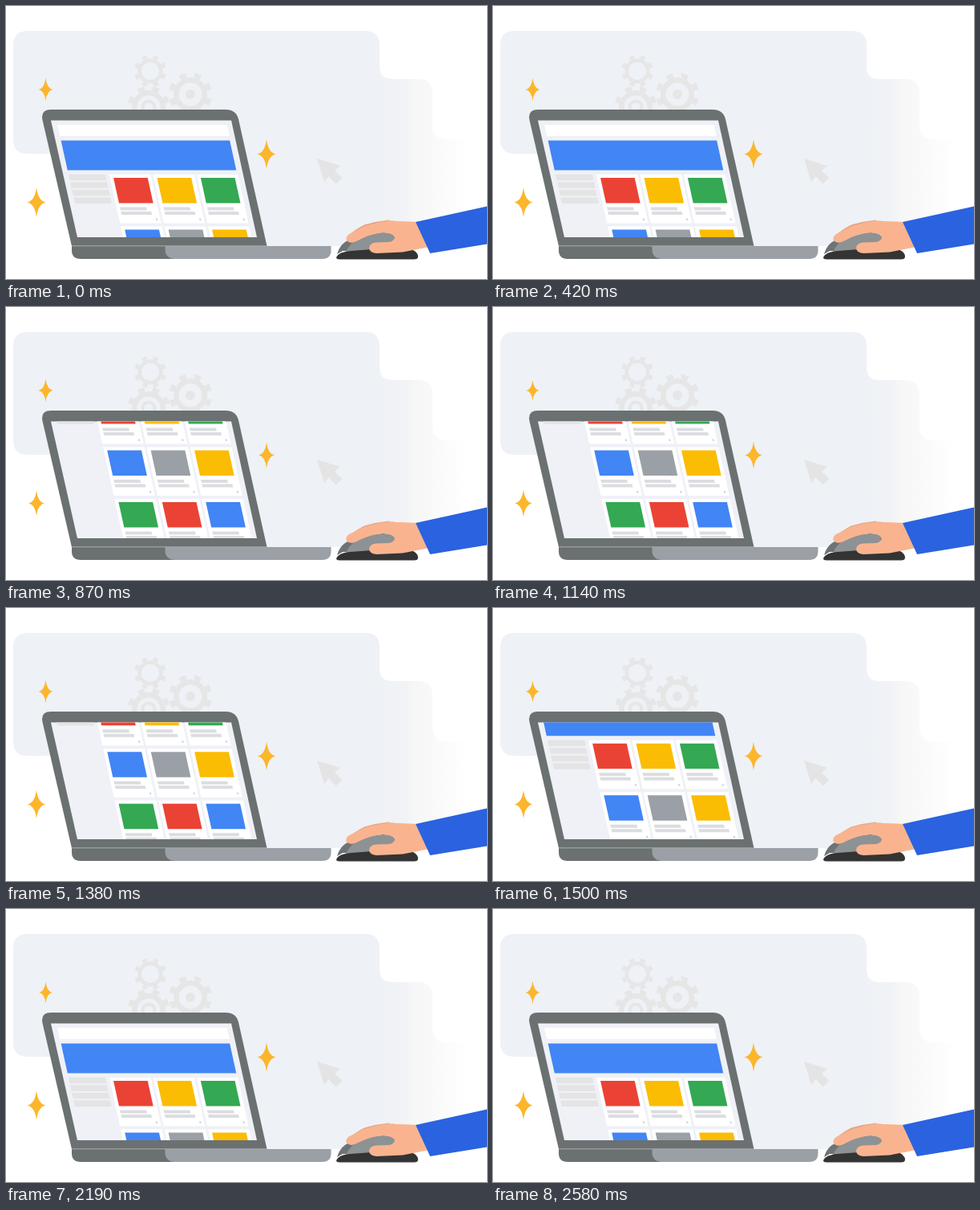
Recreate the animation shown at these times as an HTML page. Size 600x340 px, loop 2700 ms.

```html
<!DOCTYPE html>
<html lang="en">
<head>
<meta charset="utf-8">
<title>Scrolling laptop</title>
<style>
  html, body { margin: 0; width: 100%; height: 100%; overflow: hidden; background: #fff; }
  svg { display: block; width: 600px; height: 340px; }
</style>
</head>
<body>
<svg viewBox="0 0 600 340">
  <defs>
    <linearGradient id="fade" gradientUnits="userSpaceOnUse" x1="460" x2="576" y1="0" y2="0">
      <stop stop-color="#eef1f6"/>
      <stop offset=".34" stop-color="#f1f3f6"/>
      <stop offset=".4" stop-color="#f6f6f7"/>
      <stop offset=".62" stop-color="#f8f9f8"/>
      <stop offset="1" stop-color="#fff"/>
    </linearGradient>
    <clipPath id="screen"><path d="M56 142.500H281L313 288H89Z"/></clipPath>
    <path id="star" d="M0-18.500Q2-2 11.500 0Q2 2 0 18.500Q-2 2-11.500 0Q-2-2 0-18.500Z"/>
  </defs>

  <path fill="url(#fade)" d="M27 31H448Q466 31 466 49V75Q466 91 482 91H514Q532 91 532 109V148Q532 166 550 166H576V260L520 299H90L70 184H27Q9 184 9 166V49Q9 31 27 31Z"/>
  <g id="gears" fill="none" stroke="#e6e6e7"></g>
  <path fill="#e4e4e5" d="M388 190L417 199L410 205L419.500 214L411.500 221.500L402.500 212L397 219Z"/>

  <path fill="#6b7071" d="M56 129H274Q287 129 290 141L325.500 299H82L45.500 142Q43 129 56 129Z"/>
  <path fill="#eff1f7" d="M56 142.500H281L313 288H89Z"/>
  <g clip-path="url(#screen)">
    <g transform="matrix(1 0 .22 1 -31.24 0)"><g id="page"></g></g>
  </g>
  <path fill="#6b7071" d="M82 299H300V315H93Q82 315 82 304Z"/>
  <path fill="#9aa0a6" d="M198.500 299H405.500V304Q405.500 315 394.500 315H210Q198.500 314 198.500 303Z"/>
  <path stroke="#a9adaf" d="M82 298.800H325"/>

  <path fill="#6e7376" d="M413 309Q417 294 433 289L470 282Q484 282 488 292L505 305H420Z"/>
  <path fill="#8d9295" d="M424 306Q430 293 444 287Q466 280 482 284Q488 289 483 295L462 299L480 305Z"/>
  <path fill="#343434" d="M412 313Q415 306 430 305Q470 301 506 303Q514 307 514 312Q514 315.500 509 315.500H416Q412 315.500 412 313Z"/>
  <path fill="#e8a27d" d="M426 288Q429 282 447 272.500Q462 268 478 266.500L484 275L440 289Z"/>
  <path id="finger" fill="#f9b48f" d="M484 267.500L477 267.500Q462 269.500 448 274L428 284Q423 288 425 292Q429 297 437 293Q452 285 464 283Q476 281 484 285L496 276Z"/>
  <path fill="#f9b48f" d="M476 267.500L514 269L528 300L495 306.500L462 308Q453 307 453 301Q454 295 462 294.500L478 294Q485 292 485 288Q483 283 472 282Z"/>
  <path fill="#2a62e0" d="M511 269L600 249.500V296.500L529 308Z"/>

  <g id="stars" fill="#fbb62c"></g>
</svg>
<script>
const LOOP = 2700, STEP = 30, SCROLL = 100;
const $ = id => document.getElementById(id);
const red = '#ea4335', yellow = '#fbbc04', green = '#34a853', blue = '#4285f4', gray = '#9aa0a6';

function add(parent, tag, attrs) {
  const el = document.createElementNS('http://www.w3.org/2000/svg', tag);
  for (const name in attrs) el.setAttribute(name, attrs[name]);
  return parent.appendChild(el);
}

const ring = (cx, cy, r, width, more) =>
  add($('gears'), 'circle', { cx, cy, r, 'stroke-width': width, ...more });

function gear(x, y, hole, body, tip) {
  ring(x, y, (hole + body) / 2, body - hole);
  ring(x, y, (body + tip) / 2, tip - body + 1, {
    pathLength: 80, 'stroke-dasharray': '4.5 5.5', transform: `rotate(12 ${x} ${y})`
  });
}
gear(180, 81, 11, 15.5, 19.5);
gear(230, 110, 14.5, 21, 26.5);
gear(178, 126, 14.5, 21, 26);
ring(230, 110, 3, 6);
ring(178, 126, 7.5, 4);

// The page is laid out upright; its parent slants it.
const box = (x, y, width, height, fill) =>
  add($('page'), 'rect', { x, y, width, height, fill });

box(62.8, 148, 211.5, 14, '#fff');
box(63, 167.5, 210.5, 37, blue);
for (let i = 0; i < 4; i++) box(63, 209.7 + i * 9.6, 46, 7.4, '#e5e4e5');

[[red, yellow, green], [blue, gray, yellow], [green, red, blue]].forEach((row, r) =>
  row.forEach((color, c) => {
    const x = 118.2 + c * 54.4, y = 210 + r * 64.5;
    box(x - 4.2, y, 51.5, 60.5, '#fff');
    box(x, y + 4, 42.7, 31.5, color);
    box(x, y + 40.5, 33, 4, '#dcdde0');
    box(x, y + 46, 38, 4, '#dcdde0');
    box(x + 41.5, y + 54.5, 2, 2.5, '#c9d3e3');
  }));

const stars = [
  { x: 49.5, y: 104, size: .77, start: 420, period: 480, count: 4, depth: .1 },
  { x: 325, y: 184.5, size: 1, start: 660, period: 390, count: 5, depth: .15 },
  { x: 38, y: 244.5, size: 1, start: 660, period: 390, count: 5, depth: .15 }
].map(s => ({ ...s, el: add($('stars'), 'use', { href: '#star' }) }));

function ease(t, start, length) {
  const p = Math.min(1, Math.max(0, (t - start) / length));
  return p < .5 ? 4 * p ** 3 : 1 - 4 * (1 - p) ** 3;
}

// Runs 0 to 1 and back, a given number of times.
function pulse(t, start, period, count) {
  const p = (t - start) / period;
  return p > 0 && p < count ? Math.sin(Math.PI * p) ** 2 : 0;
}

function draw(t) {
  const scroll = ease(t, 570, 300) - ease(t, 1345, 300);
  $('page').setAttribute('transform', `translate(0 ${-SCROLL * scroll})`);

  const lift = ease(t, 570, 300) - ease(t, 2040, 500);
  $('finger').setAttribute('transform', `rotate(${lift} 484 276)`);

  for (const s of stars) {
    const dip = pulse(t, 0, 270, 1) + pulse(t, s.start, s.period, s.count);
    const k = s.size * (1 - s.depth * dip);
    s.el.setAttribute('transform', `translate(${s.x} ${s.y}) scale(${k})`);
  }
}

const begin = performance.now();
function tick() {
  const t = (performance.now() - begin) % LOOP;
  draw(Math.floor(t / STEP) * STEP);
  requestAnimationFrame(tick);
}
tick();
</script>
</body>
</html>
```
